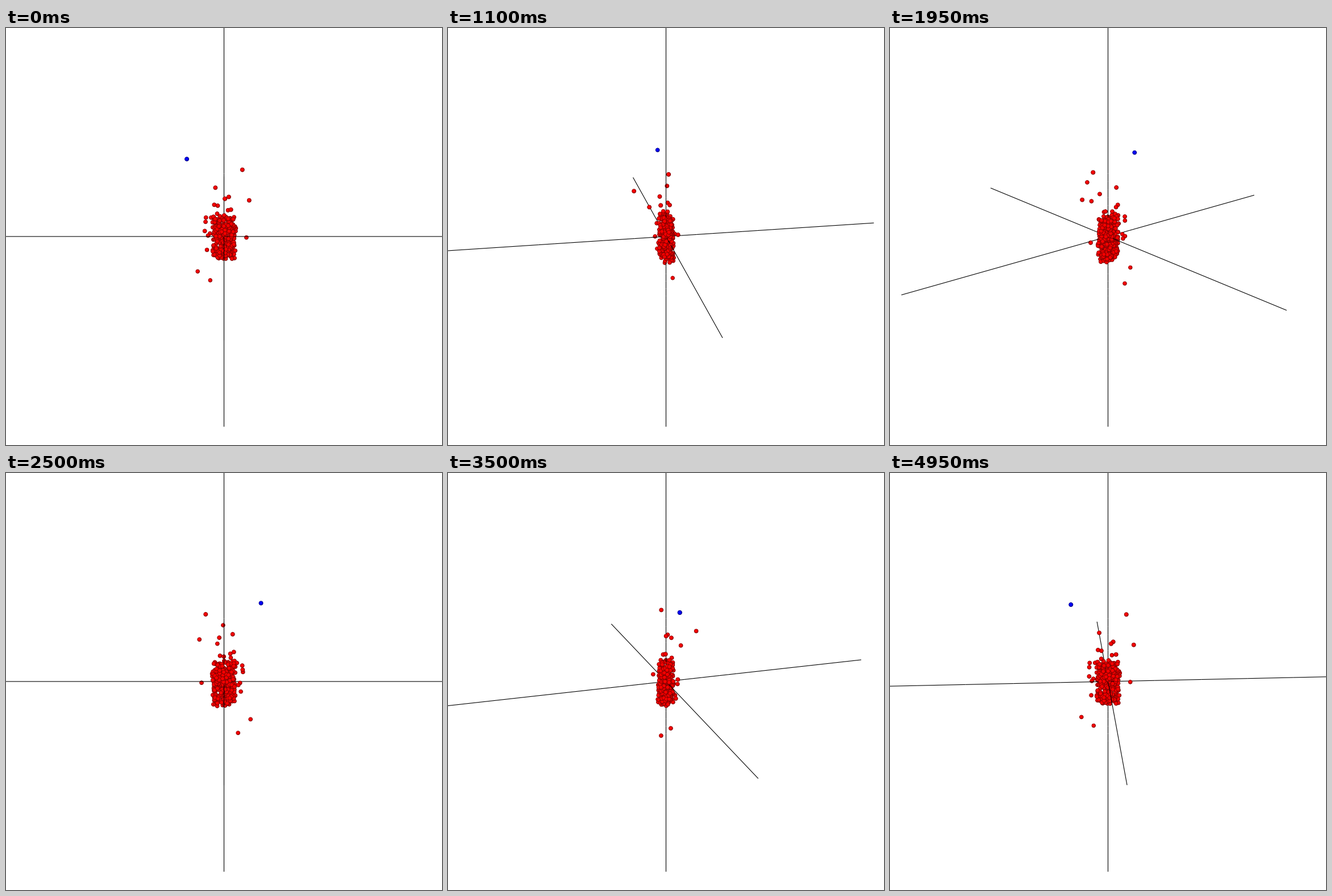
A matplotlib script for the animation above (5000 ms loop, 765 by 732 pixels).

```python
import numpy as np
import matplotlib.pyplot as plt
from matplotlib.animation import FuncAnimation
from matplotlib.collections import LineCollection

W, H, DPI = 765, 732, 96
PT = 72 / DPI                    # points per pixel
FRAMES, INTERVAL = 100, 50

# Camera: axes reach one unit from the origin
ELEV = np.radians(20)
DIST = 3.5
ZOOM = 390
RADIUS = 3.8

# Farthest balls: right, towards the viewer, up
OUTLIERS = np.array([
    (.080, .004, .311), (-.038, -.012, .225), (.110, .044, .184),
    (.004, .143, .222), (.021, .032, .196), (.030, .080, .153),
    (-.064, -.044, -.233), (-.121, -.017, -.177),
])
MARKED = np.array([(-.161, .008, .360)])


def core(rng, count):
    """Dense cloud filling an upright elliptic cylinder."""
    angle = rng.uniform(0, 2 * np.pi, count)
    reach = np.sqrt(rng.uniform(0, 1, count))
    return np.column_stack([.054 * reach * np.cos(angle),
                            .033 * reach * np.sin(angle),
                            rng.uniform(-.110, .090, count)])


def halo(rng, count):
    """Loose balls on a shell around the core."""
    way = rng.normal(size=(count, 3))
    way /= np.linalg.norm(way, axis=1, keepdims=True)
    reach = rng.uniform(.85, 1.2, (count, 1))
    return way * reach * (.085, .05, .125) + (0, 0, .015)


rng = np.random.default_rng(4)
points = np.vstack([core(rng, 290), halo(rng, 24), OUTLIERS, MARKED])
hues = np.tile((1.0, 0.0, 0.0), (len(points), 1))
hues[-1] = (0, 0, 1)

# Shading rings of one ball: relative size and brightness
RING_SIZE = np.linspace(1, .55, 5)
RING_TONE = .97 - .52 * np.linspace(1, 0, 5) ** 1.6
LIGHT = np.array([-.22, -.22])

# Depth slabs, back to front, so that balls and axes hide each other
EDGES = np.concatenate([[-9], np.linspace(-.1, .1, 17), [9]])


def turn(p, angle):
    c, s = np.cos(angle), np.sin(angle)
    x, z, y = p.T
    return np.column_stack([x * c - z * s, z * c + x * s, y])


def depth_of(p):
    return p[:, 1] * np.cos(ELEV) + p[:, 2] * np.sin(ELEV)


def project(p):
    """Screen positions and perspective scale."""
    scale = 1 / (1 - depth_of(p) / DIST)
    rise = p[:, 2] * np.cos(ELEV) - p[:, 1] * np.sin(ELEV)
    x = W / 2 + ZOOM * scale * p[:, 0]
    y = H / 2 - ZOOM * scale * rise
    return np.column_stack([x, y]), scale


fig = plt.figure(figsize=(W / DPI, H / DPI), dpi=DPI, facecolor="white")
ax = fig.add_axes([0, 0, 1, 1])
ax.set_xlim(0, W)
ax.set_ylim(H, 0)
ax.axis("off")

slabs = []
for i in range(len(EDGES) - 1):
    lines = LineCollection([], colors="black", linewidths=1.1 * PT,
                           capstyle="butt", snap=False, zorder=2 * i)
    ax.add_collection(lines, autolim=False)
    balls = ax.scatter([], [], linewidths=0, zorder=2 * i + 1)
    slabs.append((lines, balls))


def axis_parts(axes, low, high):
    """Pieces of the three axes whose depth lies in one slab."""
    parts = []
    for axis, slope in zip(axes, depth_of(axes)):
        if abs(slope) < 1e-9:
            slope = 1e-9
        t = np.clip(np.sort([low / slope, high / slope]), -1, 1)
        if t[1] > t[0]:
            parts.append(project(np.outer(t, axis))[0])
    return parts


def set_balls(balls, place, scale, hue):
    radius = RADIUS * scale[:, None] * RING_SIZE
    shift = RADIUS * np.outer(1 - RING_SIZE, LIGHT)
    balls.set_offsets((place[:, None] + shift).reshape(-1, 2))
    balls.set_sizes(((2 * radius * PT) ** 2).ravel())
    balls.set_facecolors((hue[:, None] * RING_TONE[:, None]).reshape(-1, 3))


def draw(frame):
    angle = 2 * np.pi * frame / FRAMES
    cloud = turn(points, angle)
    axes = turn(np.eye(3), angle)
    depth = depth_of(cloud)
    place, scale = project(cloud)
    order = np.argsort(depth)
    slab_of = np.digitize(depth, EDGES) - 1
    for i, (lines, balls) in enumerate(slabs):
        lines.set_segments(axis_parts(axes, EDGES[i], EDGES[i + 1]))
        pick = order[slab_of[order] == i]
        set_balls(balls, place[pick], scale[pick], hues[pick])
    return [artist for slab in slabs for artist in slab]


anim = FuncAnimation(fig, draw, frames=FRAMES, interval=INTERVAL,
                     init_func=lambda: draw(0), repeat=True, repeat_delay=0)
plt.show()
```
